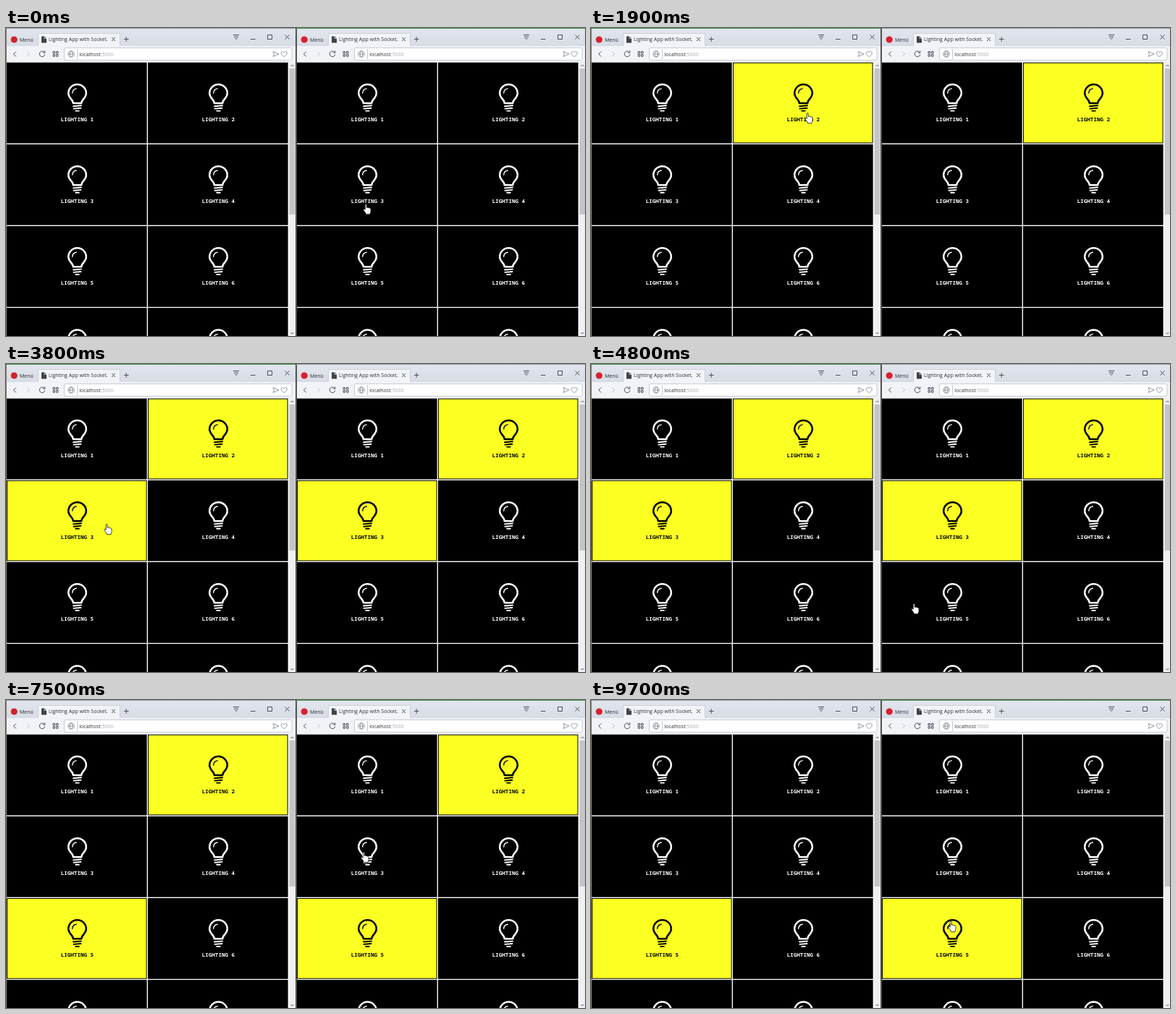
Animation of 800 by 426 pixels, one loop 10 s. Source, as an HTML page:

```html
<!DOCTYPE html>
<html lang="en">
<head>
<meta charset="utf-8">
<title>Lighting App</title>
<style>
  html, body { margin: 0; width: 100%; height: 100%; overflow: hidden; background: #000; }
  svg { display: block; width: 800px; height: 426px; }
  .ui { font: 7px "Open Sans", "Noto Sans", sans-serif; fill: #2c2f36; }
  .label { font: bold 7.55px "Noto Sans Mono", "DejaVu Sans Mono", monospace; text-anchor: middle; }
  .line { fill: none; stroke: #4b505a; }
  .thin { fill: none; stroke: #7d838e; stroke-width: .8; }
  .faint { fill: none; stroke: #c2c6ce; }
  .cell { --ink: #fff; --bg: #000; }
  .cell.on { --ink: #000; --bg: #fbff22; }
  .cell rect { fill: var(--bg); stroke: #000; }
  .cell text { fill: var(--ink); }
  .bulb { fill: none; stroke: var(--ink); stroke-width: 2.5; stroke-linecap: round; stroke-linejoin: round; }
  .edge { fill: #8e969c; }
  .focused .edge { fill: #3f9142; }
</style>
</head>
<body>
<svg viewBox="0 0 800 426" xmlns="http://www.w3.org/2000/svg">
  <defs>
    <linearGradient id="bar" x2="0" y2="1">
      <stop stop-color="#e3e6ed"/><stop offset="1" stop-color="#d6dbe5"/>
    </linearGradient>
    <clipPath id="tabClip"><rect x="58" y="8" width="83" height="16"/></clipPath>
  </defs>
  <rect width="800" height="426" fill="#4a4c4b"/>
  <g id="windows"></g>
  <g id="hand">
    <path transform="translate(1 .5)" fill="#fff" stroke="#111" stroke-width=".8" stroke-linejoin="round"
      d="M-2.8 -6C-2.8 -7.4 -.8 -7.4 -.8 -6V-2C-.4 -2.8 1 -2.7 1.2 -1.7C1.7 -2.4 3 -2.2 3.1 -1.2C3.7 -1.7 5 -1.4 5 -.2V3C5 4.5 4 5.2 4 7.2H-1.6C-1.8 5 -4.8 2.6 -5.2 .6C-5.2 -.6 -3.8 -.7 -2.8 .8Z"/>
  </g>
</svg>
<script>
  const LOOP = 10000, STEP = 100;
  const COL = 195, ROW = 113.15, GAP = 1.4;

  const lamps = [
    { n: 2, on: [1800, 1900], off: 8900 },
    { n: 3, on: [3700, 3800], off: 7500 },
    { n: 5, on: [5700, 5600], off: LOOP }
  ];

  // Each move starts where the last one ended and curves towards its bend
  const home = [498, 250];
  const moves = [
    { start: 300, end: 1400, bend: [330, -40], to: [300, 124] },
    { start: 2300, end: 3200, bend: [341, 95], to: [140, 228] },
    { start: 3900, end: 4800, bend: [225, 462], to: [447, 338] },
    { start: 6500, end: 7000, bend: [702, 290], to: [495, 217] },
    { start: 7900, end: 8600, bend: [570, 185], to: [636, 143] },
    { start: 9000, end: 9700, bend: [466, 362], to: [498, 313] }
  ];

  const path = (cls, d) => `<path class="${cls}" d="${d}"/>`;
  const square = (x, y, s) => `M${x} ${y}h${s}v${s}h${-s}Z`;
  const cross = (x, y, r) =>
    `M${x - r} ${y - r}l${2 * r} ${2 * r}M${x + r} ${y - r}l${-2 * r} ${2 * r}`;
  const chevron = (x, y, dx) => `M${x - dx} ${y - 3.5}l${2 * dx} 3.5l${-2 * dx} 3.5`;

  const tabBar = `
    <rect width="400" height="26" fill="url(#bar)"/>
    <rect y="25" width="400" height="23" fill="#f1f3f7"/>
    <path d="M44.5 25V7.5H157.5V25" fill="#f1f3f7" stroke="#c3c8d2" stroke-width=".8"/>
    <circle cx="11.2" cy="16" r="4.6" fill="#d8202f"/>
    <text class="ui" x="19" y="18.6">Menü</text>
    <path d="M49 11.5h4l3 3v6h-7Z" fill="#3d4047"/>
    <path d="M53 11.5v3h3" fill="none" stroke="#f1f3f7" stroke-width=".7"/>
    <text class="ui" x="59" y="18.4" clip-path="url(#tabClip)">Lighting App with Socket.io</text>
    ${path("line", cross(148.5, 15.5, 2.5) + "M163 15.5h6.5M166.2 12.2v6.6")}
    ${path("line", "M314 9.5h8M315 12h6M316 13.5l2 2l2 -2M338 15.5h6.5")}
    ${path("line", square(361.5, 9.5, 6) + cross(388.5, 12.5, 3))}`;

  const grid = [65, 69.5].map(x => square(x, 32.5, 2.5) + square(x, 36.7, 2.5)).join("");

  const toolbar = `
    ${path("line", chevron(12.2, 36, -1.75))}
    ${path("faint", chevron(30.8, 36, 1.75))}
    ${path("line", "M53 33.5A3.8 3.8 0 1 0 53.8 36.5M53.8 31.5v2.7H51" + grid)}
    <rect x="80.5" y="27.5" width="314.5" height="17" rx="1.5" fill="#fff" stroke="#c8ccd5"/>
    <circle class="thin" cx="90" cy="36" r="4.2"/>
    <ellipse class="thin" cx="90" cy="36" rx="1.9" ry="4.2"/>
    ${path("thin", "M86 36h8M369 32.5l8 3.5l-8 3.5l1.5 -3.5Z")}
    ${path("thin", "M384.3 40l-3.6 -3.7c-2 -2.7 1.8 -5.6 3.6 -2.5c1.8 -3.1 5.6 -.2 3.6 2.5Z")}
    ${path("faint", "M98.5 29v14")}
    <text class="ui" x="101.3" y="38.7">localhost<tspan fill="#a7abb3">:5000</tspan></text>`;

  const scrollbar = `
    <rect x="391" y="47" width="9" height="379" fill="#f0f0f1"/>
    <rect x="391.5" y="56" width="8" height="202" fill="#c4c5c7"/>
    ${path("line", "M393.5 53l2 -2l2 2M393.5 421l2 2l2 -2")}`;

  const bulb = `
    <path d="M92.8 104C92.8 98.8 86.2 97 86.2 90.3A12.3 12.3 0 0 1 110.8 90.3C110.8 97 104.2 98.8 104.2 104Z"/>
    <path stroke-width="1.4" style="stroke-width:1.4" d="M91.7 90C91.9 86.7 94 84.3 97.2 83.9"/>
    <path style="stroke-width:1.9" d="M93 108.2l11 -.9M93.5 111.6l10 -.9M96.2 114.6h4.6"/>`;

  function cell(i) {
    const x = (i % 2) * COL, y = Math.floor(i / 2) * ROW;
    return `<g class="cell" transform="translate(${x} ${y})">
      <rect x="1.5" y="48.2" width="${COL - GAP - 1}" height="${ROW - GAP - 1}"/>
      <g class="bulb">${bulb}</g>
      <text class="label" x="98.4" y="128.5">LIGHTING ${i + 1}</text></g>`;
  }

  function browser(x) {
    const cells = Array.from({ length: 8 }, (_, i) => cell(i)).join("");
    return `<g class="window" transform="translate(${x} 0)">
      ${tabBar}${toolbar}
      <rect x="1" y="48" width="390" height="378" fill="#fff"/>
      ${cells}${scrollbar}
      <rect class="edge" width="400" height="1"/>
      <rect y="1" width="1" height="425" fill="${x ? "#55594f" : "#8a8068"}"/></g>`;
  }

  document.getElementById("windows").innerHTML = browser(0) + browser(401);
  const hand = document.getElementById("hand");
  const panes = [...document.querySelectorAll(".window")];
  const cells = panes.map(p => p.querySelectorAll(".cell"));

  const ease = p => (p + p * p * (3 - 2 * p)) / 2;

  function cursorAt(t) {
    let pos = home;
    for (const { start, end, bend, to } of moves) {
      if (t <= start) break;
      const p = ease(Math.min(1, (t - start) / (end - start))), q = 1 - p;
      pos = pos.map((from, k) => q * q * from + 2 * q * p * bend[k] + p * p * to[k]);
    }
    return pos;
  }

  function draw(now) {
    const t = Math.floor((now % LOOP) / STEP) * STEP;
    const active = t >= 1800 && t < 5600 ? 0 : 1;
    panes.forEach((pane, side) => {
      pane.classList.toggle("focused", side === active);
      for (const { n, on, off } of lamps) {
        cells[side][n - 1].classList.toggle("on", t >= on[side] && t < off);
      }
    });
    const [x, y] = cursorAt(t);
    hand.setAttribute("transform", `translate(${x.toFixed(1)} ${y.toFixed(1)})`);
  }

  const origin = performance.now();
  function tick() {
    draw(performance.now() - origin);
    requestAnimationFrame(tick);
  }
  tick();
</script>
</body>
</html>
```
